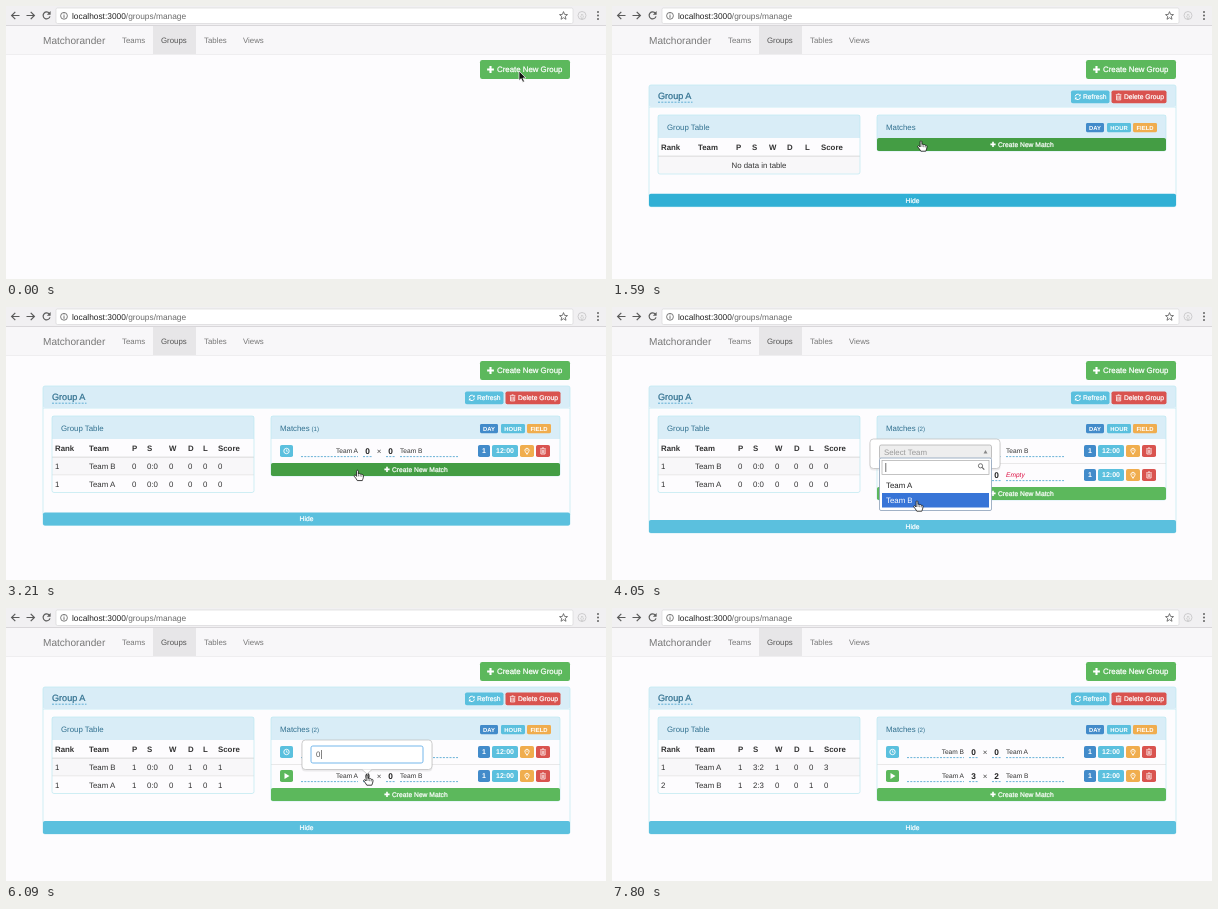
Recreate the animation shown at these times as an HTML page. Size 600 px wide and 273 px high, loop 7.83 s.

```html
<!DOCTYPE html>
<html lang="en">
<head>
<meta charset="utf-8">
<title>Group manager</title>
<style>
  html, body { margin: 0; width: 100%; height: 100%; overflow: hidden; background: #fdfcfe; }
  svg { display: block; width: 600px; height: 273px; }
  text { font-family: "Liberation Sans", Arial, sans-serif; text-rendering: geometricPrecision; white-space: pre; }
</style>
</head>
<body>
<svg viewBox="0 0 600 273">
  <g id="page"></g>
  <g id="pointer"></g>
</svg>
<script>
const LOOP = 7830;
const BODY = 7.85, SMALL = 6.73;
const C = {
  page: '#fdfcfe', ink: '#333', info: '#5bc0de', infoDark: '#31b0d5', green: '#5cb85c',
  greenDark: '#449d44', red: '#d9534f', blue: '#428bca', orange: '#f0ad4e',
  head: '#d9edf7', edge: '#bce8f1', headText: '#31708f', link: '#2a93c6', line: '#ddd'
};

// When each thing happens, in ms
const T = {
  group: 420, show: 900, add1: 1710, left1: 2430, right1: 3030, add2: 3390,
  left2: 4140, right2: 4740, play: 5550, score1: 6480, table1: 6600, score2: 7410, table2: 7530
};

// time, x, y, shape: a = arrow, h = hand, empty = hidden
const PATH = [
  [0, 513, 65, 'a'], [450, 513, 65, 'a'], [780, 330, 107, 'h'], [1050, 328, 107, 'h'],
  [1500, 309, 135, 'h'], [1740, 309, 135, 'h'], [1920, 338, 143, 'h'], [2010, 338, 143, 'h'],
  [2310, 311, 153, 'h'], [2460, 311, 153, 'h'], [2640, 404, 143, 'h'], [2730, 404, 143, 'h'],
  [2940, 398, 169, 'h'], [3060, 398, 169, 'h'], [3270, 340, 162, 'h'], [3420, 340, 162, 'h'],
  [3600, 336, 167, 'h'], [3690, 336, 167, 'h'], [3960, 305, 194, 'h'], [4170, 305, 194, 'h'],
  [4380, 404, 167, 'h'], [4470, 404, 167, 'h'], [4650, 398, 178, 'h'], [4770, 398, 178, 'a'],
  [5130, 260, 132, 'a'], [5310, 260, 132, 'a'], [5460, 281, 144, 'h'], [5610, 281, 144, 'h'],
  [5850, 361, 167, 'h'], [6210, 361, 167, ''], [6960, 361, 167, 'h'], [7050, 384, 167, 'h'],
  [7200, 384, 167, '']
];

// from, to, centre x, row, typed value and time it is typed (score fields only)
const POPS = [
  [2010, T.left1, 323, 0], [2730, T.right1, 423, 0],
  [3690, T.left2, 323, 1], [4470, T.right2, 423, 1],
  [5910, T.score1, 361, 1, 3, 6210], [7080, T.score2, 384, 1, 2, 7200]
];

const ease = p => p * p * (3 - 2 * p);
const clamp = p => Math.max(0, Math.min(1, p));

const rect = (x, y, w, h, fill, r = 0, more = '') =>
  `<rect x="${x}" y="${y}" width="${w}" height="${h}" rx="${r}" fill="${fill}" ${more}/>`;
const path = (d, stroke, w = 1, fill = 'none', more = '') =>
  `<path d="${d}" stroke="${stroke}" stroke-width="${w}" fill="${fill}" ${more}/>`;
const text = (x, y, s, size = BODY, fill = C.ink, more = '') =>
  `<text x="${x}" y="${y}" font-size="${size}" fill="${fill}" ${more}>${s}</text>`;
const at = (x, y, s) => `<g transform="translate(${x} ${y})">${s}</g>`;
const BOLD = 'font-weight="700"', MID = 'text-anchor="middle"', END = 'text-anchor="end"';
const heavy = c => `stroke="${c}" stroke-width=".22"`;
const dash = (x1, x2, y) => path(`M${x1} ${y}H${x2}`, C.link, .7, 'none', 'stroke-dasharray="2 1.3"');

// Small icons, centred on the origin
const icon = {
  plus: s => path(`M${-s} 0H${s}M0 ${-s}V${s}`, '#fff', s * .62),
  refresh: path('M-2.6 -.5A2.6 2.6 0 0 1 2 -1.7M2.6 .5A2.6 2.6 0 0 1 -2 1.7', '#fff', 1) +
    path('M2.9 -3V-.6H.6ZM-2.9 3V.6H-.6Z', 'none', 0, '#fff'),
  trash: path('M-2.8 -2.2H2.8M-.9 -3.1H.9M-2.1 -1.6V3H2.1V-1.6M-.7 -1V2.2M.7 -1V2.2', '#fff', .75),
  clock: '<circle r="2.7" fill="none" stroke="#fff" stroke-width=".9"/>' + path('M0 -1.6V.2H1.3', '#fff', .7),
  play: path('M-2 -2.9L3 0L-2 2.9Z', 'none', 0, '#fff'),
  pin: path('M0 3.4L-1.7 .6A2.1 2.1 0 1 1 1.7 .6Z', '#fff', .9) + '<circle cy="-.9" r=".7" fill="#fff"/>'
};

function browser() {
  const g = '#5a5a5a';
  return rect(0, 0, 600, 20, '#f1f0f2') + rect(0, 19.3, 600, .8, '#cfced0') +
    rect(50, 2, 517, 15.5, '#fff', 1.5, 'stroke="#d4d3d5" stroke-width=".6"') +
    path('M13.5 9.5H5.8M9.3 5.8L5.6 9.5L9.3 13.2M20.5 9.5H28.2M24.7 5.8L28.4 9.5L24.7 13.2', g, 1.2) +
    path('M43.4 7.2A3.5 3.5 0 1 0 44 10.3', g, 1.2) + path('M44.6 5V8.7H40.9Z', 'none', 0, g) +
    `<circle cx="58" cy="9.8" r="3.4" fill="none" stroke="${g}" stroke-width=".8"/>` +
    path('M58 9.2V11.8M58 7.6V8.4', g, .9) +
    text(66, 12.7, 'localhost:3000<tspan fill="#6b6b6b">/groups/manage</tspan>', 8.35, '#222') +
    path('M557.5 5.6L558.6 8.4L561.5 8.6L559.3 10.4L560 13.3L557.5 11.7L555 13.3L555.7 10.4L553.5 8.6L556.4 8.4Z', g, .8) +
    '<circle cx="576" cy="9.5" r="4" fill="none" stroke="#c9c8ca" stroke-width=".9"/>' +
    text(576, 11.7, '{}', 5.6, '#bbb', MID) +
    [6, 9.5, 13].map(y => `<circle cx="592" cy="${y}" r=".95" fill="${g}"/>`).join('');
}

function navbar() {
  const tabs = [[116, 'Teams'], [155, 'Groups'], [198, 'Tables'], [237, 'Views']];
  return rect(0, 20, 600, 28, '#f8f7f9') + rect(0, 48, 600, .6, '#e7e6e8') +
    rect(147, 20, 43, 28, '#e7e6e8') + text(37, 37.7, 'Matchorander', 10.1, '#777') +
    tabs.map(([x, s]) => text(x, 37, s, BODY, s === 'Groups' ? '#555' : '#777')).join('');
}

function button(x, y, w, h, fill, art, label = '', tx = 0) {
  return rect(x, y, w, h, fill, 1.8) + art +
    (label && text(tx, y + h / 2 + 2.4, label, SMALL, '#fff', heavy('#fff')));
}

function heading(x, w, label) {
  return rect(x, 109, w, 23, C.head) + text(x + 9, 123.6, label, BODY, C.headText);
}

// Standings rows: rank, team, P, S, W, D, L, score
function standings(t) {
  if (t < T.right1) return [];
  if (t < T.play) return ['B', 'A'].map(n => [1, 'Team ' + n, 0, '0:0', 0, 0, 0, 0]);
  if (t < T.table1) return ['B', 'A'].map(n => [1, 'Team ' + n, 1, '0:0', 0, 1, 0, 1]);
  const b = t < T.table2 ? 0 : 2;
  return [[1, 'Team A', 1, '3:' + b, 1, 0, 0, 3], [2, 'Team B', 1, b + ':3', 0, 0, 1, 0]];
}

function tablePanel(rows) {
  const names = ['Rank', 'Team', 'P', 'S', 'W', 'D', 'L', 'Score'];
  const cols = rows.length ? [49, 83, 126, 141, 163, 182, 197, 212] : [49, 86, 124, 140, 157, 175, 193, 209];
  const bottom = rows.length ? 185.5 : 168;
  let s = heading(46, 202, 'Group Table') + rect(46, 150, 202, 17.6, '#f8f7f9') +
    names.map((n, i) => text(cols[i], 144, n, BODY, C.ink, BOLD)).join('') + rect(46, 149.6, 202, 1.1, C.line);
  if (!rows.length) s += text(147, 162, 'No data in table', BODY, C.ink, MID);
  rows.forEach((r, i) => {
    if (i) s += rect(46, 167.6, 202, .6, C.line);
    s += r.map((v, j) => text(cols[j], 162 + i * 17.8, v)).join('');
  });
  return s + rect(46, 109, 202, bottom - 109, 'none', 2, `stroke="${C.edge}" stroke-width=".7"`);
}

function matches(t) {
  const one = { l: t >= T.left1 && 'Team A', r: t >= T.right1 && 'Team B', a: 0, b: 0, on: t >= T.play };
  const two = { l: t >= T.left2 && 'Team B', r: t >= T.right2 && 'Team A', a: 0, b: 0 };
  if (t >= T.score1) one.a = 3;
  if (t >= T.score2) one.b = 2;
  if (t < T.add1) return [];
  if (t < T.add2) return [one];
  return t < T.play ? [one, two] : [two, one];
}

function matchRow(m, i) {
  const c = 144 + i * 24;
  const team = (x, s, more) => text(x, c + 2.2, s || 'Empty', 6.6, s ? C.ink : '#d14', more + (s ? '' : ' font-style="italic"'));
  const score = (x, v) => text(x, c + 2.6, v, 8.3, '#222', BOLD + ' ' + MID) + dash(x - 4.5, x + 4.5, c + 5.6);
  const y = c - 6;
  return (i ? rect(265, c - 12, 289, .6, C.line) : '') +
    button(274, y, 13, 12, m.on ? C.green : C.info, at(280.5, c, m.on ? icon.play : icon.clock)) +
    team(352, m.l, END) + dash(295, 352, c + 5.6) + score(361.5, m.a) +
    text(373, c + 2.5, '×', 8, '#444', MID) + score(384.5, m.b) +
    team(394, m.r, '') + dash(394, 452, c + 5.6) +
    rect(472, y, 12, 12, C.blue, 1.8) + text(478, c + 2.4, '1', 7, '#fff', BOLD + ' ' + MID) +
    rect(486, y, 26, 12, C.info, 1.8) + text(499, c + 2.4, '12:00', 7, '#fff', BOLD + ' ' + MID) +
    button(514, y, 14, 12, C.orange, at(521, c, icon.pin)) +
    button(530, y, 14, 12, C.red, at(537, c, icon.trash));
}

function matchPanel(list, hover) {
  const y = 132 + list.length * 24;
  const labels = [[474, 18, 'DAY', C.blue], [495, 24, 'HOUR', C.info], [521, 24, 'FIELD', C.orange]];
  const count = list.length ? `<tspan font-size="6.2"> (${list.length})</tspan>` : '';
  return heading(265, 289, 'Matches' + count) +
    labels.map(([x, w, s, f]) => rect(x, 117, w, 9.2, f, 1.4) +
      text(x + w / 2, 123.8, s, 5.9, '#fff', BOLD + ' ' + MID)).join('') +
    list.map(matchRow).join('') +
    rect(265, 109, 289, y + 13 - 109, 'none', 2, `stroke="${C.edge}" stroke-width=".7"`) +
    rect(265, y, 289, 13, hover ? C.greenDark : C.green, 1.8) +
    at(381, y + 6.4, icon.plus(2.6)) + text(386, y + 8.9, 'Create New Match', SMALL, '#fff', heavy('#fff'));
}

function groupPanel(t, mouse) {
  const rows = standings(t), list = matches(t);
  const full = Math.max(rows.length ? 185.5 : 167.7, 145 + list.length * 24) + 20;
  const bar = 101 + (full - 101) * ease(clamp((t - T.show) / 300));
  const addY = 132 + list.length * 24;
  const over = mouse.kind === 'h' && mouse.x > 265 && mouse.x < 554 && mouse.y >= addY && mouse.y < addY + 13;
  const popped = POPS.some(p => t >= p[0] && t < p[1]);
  const lit = t >= 750 && t < T.add1;
  return rect(37, 79, 527, 22, C.head, 2) +
    text(46, 93.4, 'Group A', 9.1, C.headText, heavy(C.headText)) + dash(46, 80.5, 96.2) +
    button(459, 84.5, 38.5, 12.8, C.info, at(465.8, 90.9, icon.refresh), 'Refresh', 471) +
    button(499.5, 84.5, 55, 12.8, C.red, at(506.6, 90.9, icon.trash), 'Delete Group', 512) +
    `<clipPath id="fold"><rect x="37" y="101" width="527" height="${bar - 101}"/></clipPath>` +
    `<g clip-path="url(#fold)">${rect(37, 100.7, 527, .7, C.edge)}${tablePanel(rows)}${matchPanel(list, over && !popped && t > T.show + 300)}</g>` +
    rect(37, 79, 527, bar - 66, 'none', 2, `stroke="${C.edge}" stroke-width=".7"`) +
    rect(37, bar, 527, 13, lit ? C.infoDark : C.info, 1.8) +
    text(300.5, bar + 8.9, t < T.show ? 'Show' : 'Hide', SMALL, '#fff', MID + ' ' + heavy('#fff'));
}

function popover([from, to, cx, row, value, typed], t, mouse) {
  const x = cx - 65, y = 108 + row * 24;
  let s = rect(x - .5, y + 1.5, 131, 30, '#000', 4, 'opacity=".07"') +
    rect(x, y, 130, 29.5, '#fff', 3.4, 'stroke="#bbb" stroke-width=".7"') +
    path(`M${cx - 5} ${y + 29.5}L${cx} ${y + 34}L${cx + 5} ${y + 29.5}`, '#bbb', .7, '#fff');
  if (value) {
    return s + rect(x + 9, y + 6, 112, 17, '#fff', 1.8, 'stroke="#66afe9" stroke-width=".9"') +
      text(x + 14, y + 17.3, t < typed ? 0 : value, BODY, '#555') +
      rect(x + 19, y + 10, .6, 9, '#333');
  }
  const l = x + 9.5, w = 112;
  s += rect(l, y + 6, w, 14, '#eee', 1.8, 'stroke="#aaa" stroke-width=".7"') +
    text(l + 4.5, y + 15.7, 'Select Team', BODY, '#999') +
    path(`M${l + 104} ${y + 14.5}h4l-2 -3.4Z`, 'none', 0, '#888') +
    rect(l, y + 19, w, 52.5, '#fff', 1.5, 'stroke="#8a9fb8" stroke-width=".8"') +
    rect(l + 2.5, y + 21.5, w - 5, 14, '#fff', 0, 'stroke="#aaa" stroke-width=".7"') +
    `<circle cx="${l + 101}" cy="${y + 26.8}" r="2.1" fill="none" stroke="#666" stroke-width=".9"/>` +
    path(`M${l + 102.6} ${y + 28.4}l2.2 2.2`, '#666', 1.2);
  if (row) s += rect(l + 6, y + 24, .7, 9, '#333');
  const pick = mouse.y >= y + 53.5 && mouse.y < y + 69 ? 1 : 0;
  ['Team A', 'Team B'].forEach((n, i) => {
    const iy = y + 39 + i * 15;
    if (i === pick) s += rect(l + 2.5, iy, w - 5, 14.5, '#3875d7');
    s += text(l + 6.5, iy + 10, n, BODY, i === pick ? '#fff' : '#222');
  });
  return s;
}

const SHAPES = {
  a: path('M0 0V9.6L2.2 7.6L3.8 11.2L5.4 10.5L3.9 7H6.9Z', '#fff', .7, '#111'),
  h: path('M-.9 .8C-.9 -.5 .9 -.5 .9 .8V3.6C1.4 3 2.5 3.1 2.7 3.9C3.3 3.4 4.3 3.6 4.4 4.4C5.2 4 6 4.5 6 5.3C6 7.8 5.2 8.6 4.8 10.2H-.2C-.9 8.4 -2.4 7.2 -3.3 5.8C-3.6 4.8 -2.4 4.3 -1.7 5.1L-.9 6Z',
    '#111', .8, '#fff', 'stroke-linejoin="round"') + path('M1 4V6M2.7 4.4V6.2M4.3 4.9V6.4', '#111', .5),
  '': ''
};

function pointerAt(t) {
  let i = PATH.length - 1;
  while (PATH[i][0] > t) i--;
  const [t0, x0, y0, kind] = PATH[i], [t1, x1, y1] = PATH[i + 1] || [LOOP, x0, y0];
  const p = ease(clamp((t - t0) / (t1 - t0)));
  return { x: x0 + (x1 - x0) * p, y: y0 + (y1 - y0) * p, kind };
}

const page = document.getElementById('page'), pointer = document.getElementById('pointer');
const fixed = rect(0, 0, 600, 273, C.page) + browser() + navbar() +
  rect(474, 54, 90, 19, C.green, 2.2) + at(484.5, 63.5, icon.plus(3.4)) +
  text(491, 66.3, 'Create New Group', 7.85, '#fff', heavy('#fff'));
let last = '';

function draw(t) {
  const mouse = pointerAt(t);
  const pop = POPS.find(p => t >= p[0] && t < p[1]);
  const html = fixed + (t >= T.group ? groupPanel(t, mouse) : '') + (pop ? popover(pop, t, mouse) : '');
  if (html !== last) page.innerHTML = last = html;
  pointer.innerHTML = at(mouse.x, mouse.y, SHAPES[mouse.kind]);
}

const start = performance.now();
function tick(now) {
  const t = Math.max(0, now - start) % LOOP;
  draw(Math.floor(t / 30) * 30);
  requestAnimationFrame(tick);
}
draw(0);
requestAnimationFrame(tick);
</script>
</body>
</html>
```
